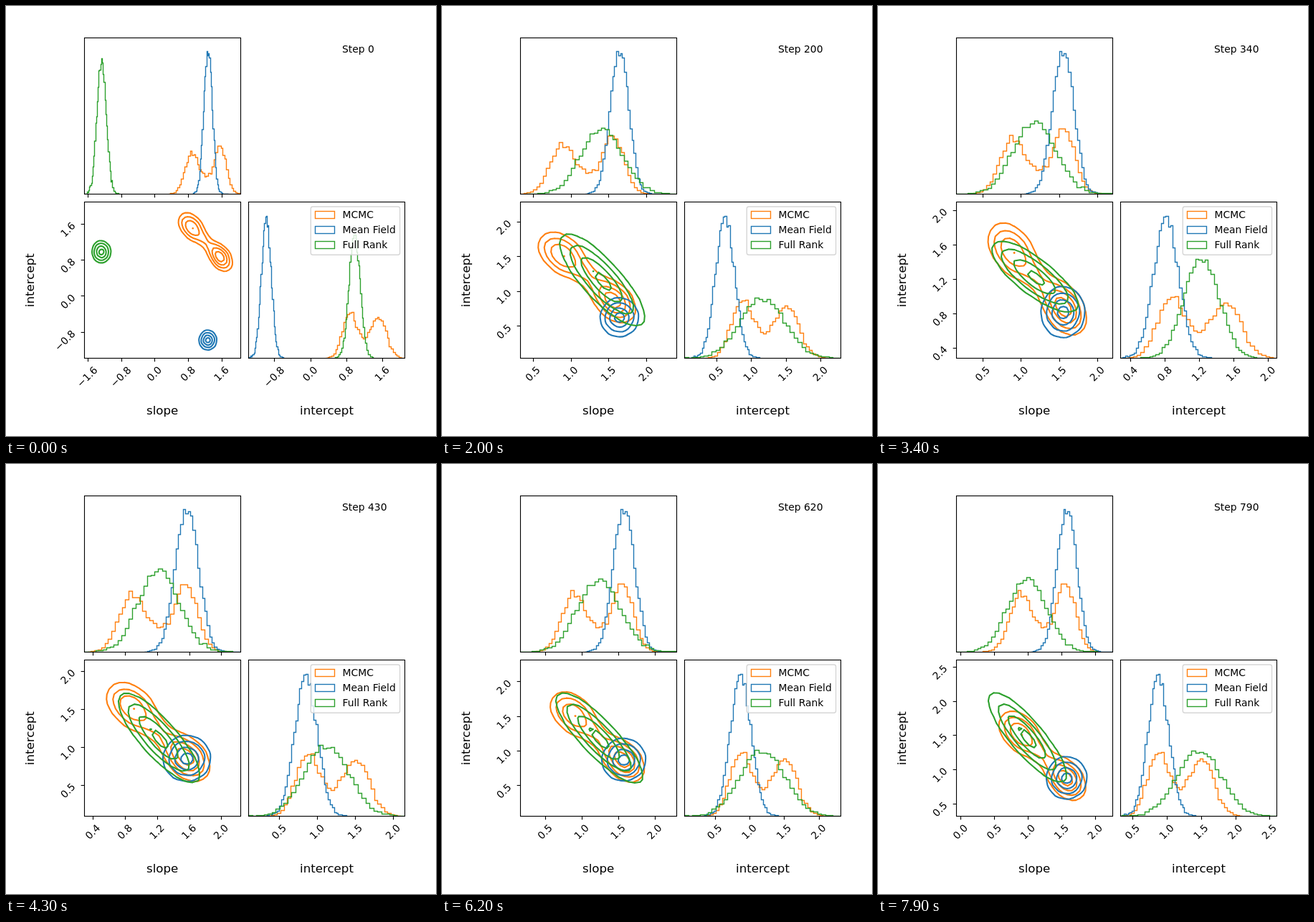
Write an HTML page that moves like this. It is 600x600 px and loops after 8000 ms.

```html
<!DOCTYPE html>
<html lang="en">
<head>
<meta charset="utf-8">
<style>
  html, body { margin: 0; width: 100%; height: 100%; overflow: hidden; background: #fff; }
  svg { display: block; width: 600px; height: 600px; font: 13.89px "DejaVu Sans", sans-serif; }
  .label { font-size: 16.67px; text-anchor: middle; }
  .tick { text-anchor: middle; }
  .line { fill: none; stroke-width: 1.39; }
  .contour { fill: none; stroke-width: 2.08; stroke-linecap: round; }
  .frame { fill: none; stroke: #000; stroke-width: 1.11; }
</style>
</head>
<body>
<svg id="stage" viewBox="0 0 600 600"></svg>
<script>
const SIZE = 218.18, X1 = 109.09, X2 = 338.18, BASE1 = 261.82, BASE2 = 490.91;
const COLORS = ['#ff7f0e', '#1f77b4', '#2ca02c'];
const NAMES = ['MCMC', 'Mean Field', 'Full Rank'];
const SAMPLES = 16000, BINS = 40, CELLS = 28, STEPS = 80;

// Waypoints of the full rank fit: step, slope mean and sd, intercept mean and sd.
const WAYPOINTS = [
  [0, -1.27, .11, .98, .122],
  [20, 1.41, .27, 1.163, .316],
  [34, 1.178, .276, 1.225, .2],
  [43, 1.22, .25, 1.12, .289],
  [54, 1.35, .222, 1.128, .232],
  [70, 1.12, .358, 1.245, .402],
  [79, .987, .283, 1.47, .318]
];

function fullRank(step) {
  const i = Math.max(1, WAYPOINTS.findIndex(w => w[0] >= step));
  const a = WAYPOINTS[i - 1], b = WAYPOINTS[i];
  let u = (step - a[0]) / (b[0] - a[0]);
  if (i === 1) u = 1 - (1 - u) ** 1.7;
  const [mx, sx, my, sy] = a.map((v, k) => v + (b[k] - v) * u).slice(1);
  // The ridge keeps its width, so a longer ellipse is more correlated.
  const rho = (.009 / (sx * sy) - 1) * (1 - Math.exp(-step / 6));
  return [mx, sx, my, sy, rho];
}

// The mean field fit settles: a damped swing in slope, plain decay elsewhere.
function meanField(step) {
  return [
    1.575 - .305 * Math.exp(-step / 14) * Math.cos(step * Math.PI / 18),
    .145 - .043 * Math.exp(-((step / 25) ** 2)),
    .875 - 1.858 * Math.exp(-step / 10),
    .152 - .044 * Math.exp(-step / 18),
    0
  ];
}

function random(seed) {
  return () => {
    seed = seed + 0x6D2B79F5 | 0;
    let t = Math.imul(seed ^ seed >>> 15, 1 | seed);
    t = t + Math.imul(t ^ t >>> 7, 61 | t) ^ t;
    return ((t ^ t >>> 14) >>> 0) / 4294967296;
  };
}

// Pairs of independent standard normal numbers.
function normals(seed) {
  const rnd = random(seed);
  return Array.from({ length: SAMPLES }, () => {
    const r = Math.sqrt(-2 * Math.log(1 - rnd())), a = 2 * Math.PI * rnd();
    return [r * Math.cos(a), r * Math.sin(a)];
  });
}

const place = ([p, q], [mx, sx, my, sy, rho]) =>
  [mx + sx * p, my + sy * (rho * p + Math.sqrt(1 - rho * rho) * q)];

function summary(points, ranges) {
  return {
    ranges,
    hists: ranges.map((range, d) => histogram(points.map(p => p[d]), range)),
    segments: contours(points, ranges)
  };
}

function histogram(values, [lo, hi]) {
  const width = (hi - lo) / BINS, heights = Array(BINS).fill(0);
  for (const v of values) {
    const i = Math.floor((v - lo) / width);
    if (i >= 0 && i < BINS) heights[i] += 1 / (values.length * width);
  }
  return { lo, width, heights };
}

// Contour lines around 12, 39, 68 and 86 percent of the mass.
function contours(points, [[xlo, xhi], [ylo, yhi]]) {
  const N = CELLS, dx = (xhi - xlo) / N, dy = (yhi - ylo) / N;
  let grid = Array(N * N).fill(0);
  for (const [x, y] of points) {
    const i = Math.floor((x - xlo) / dx), j = Math.floor((y - ylo) / dy);
    if (i >= 0 && i < N && j >= 0 && j < N) grid[j * N + i]++;
  }
  for (const s of [1, N, 1, N])
    grid = grid.map((v, k) => .58 * v + .21 * ((grid[k - s] || 0) + (grid[k + s] || 0)));

  const sorted = [...grid].sort((a, b) => b - a);
  const total = sorted.reduce((a, b) => a + b);
  const segments = [];
  for (const k of [.5, 1, 1.5, 2]) {
    let sum = 0;
    const level = sorted.find(v => (sum += v) >= total * (1 - Math.exp(-k * k / 2)));
    for (let j = 0; j < N - 1; j++) for (let i = 0; i < N - 1; i++) {
      const corners = [[i, j], [i + 1, j], [i + 1, j + 1], [i, j + 1]], hits = [];
      corners.forEach((a, c) => {
        const b = corners[(c + 1) % 4];
        const va = grid[a[1] * N + a[0]], vb = grid[b[1] * N + b[0]];
        if (va > level === vb > level) return;
        const u = (level - va) / (vb - va);
        hits.push([xlo + (a[0] + (b[0] - a[0]) * u + .5) * dx,
                   ylo + (a[1] + (b[1] - a[1]) * u + .5) * dy]);
      });
      for (let h = 0; h < hits.length; h += 2) segments.push([hits[h], hits[h + 1]]);
    }
  }
  return segments;
}

// Two modes with a thin bridge between them.
const MODES = [
  [.42, [.88, .16, 1.53, .17, -.45]],
  [.85, [1.57, .14, .86, .15, -.45]],
  [1, [1.22, .2, 1.2, .2, -.85]]
];
const chain = summary(
  normals(11).map((z, i) => place(z, MODES.find(m => (i + .5) / SAMPLES < m[0])[1])),
  [[.33, 2.05], [.34, 2.1]]);

// The same random draws serve every step; reach is their extent in sds.
function fit(seed, params, reach) {
  const draws = normals(seed);
  return step => {
    const p = params(step);
    const ranges = reach.map(([down, up], d) =>
      [p[2 * d] - down * p[2 * d + 1], p[2 * d] + up * p[2 * d + 1]]);
    return summary(draws.map(z => place(z, p)), ranges);
  };
}
const fits = [
  fit(5, meanField, [[3.7, 4.7], [3.65, 3.6]]),
  fit(9, fullRank, [[3.72, 3.67], [3.55, 3.57]])
];

function ticks([lo, hi]) {
  const raw = (hi - lo) / 5;
  const gap = [.1, .15, .2, .25, .3, .4, .5, .6, .8, 1].find(s => s >= raw);
  const list = [];
  for (let i = Math.ceil(lo / gap); i * gap <= hi; i++) list.push(i * gap);
  return list;
}

const snap = v => Math.round(v) + .5;
const scale = ([lo, hi], from, length) => v => from + (v - lo) / (hi - lo) * length;

function histPaths(hists, toX, base, clip) {
  const top = Math.max(...hists.flatMap(h => h.heights)) * 1.1;
  return `<g class="line" clip-path="url(#${clip})">` + hists.map((h, c) => {
    let d = `M${snap(toX(h.lo))} ${snap(base)}`;
    h.heights.forEach((v, i) => {
      d += `V${snap(base - v / top * SIZE)}H${snap(toX(h.lo + (i + 1) * h.width))}`;
    });
    return `<path d="${d}V${snap(base)}" stroke="${COLORS[c]}"/>`;
  }).join('') + '</g>';
}

function tickText(v, at) {
  const [x, y] = at(v < -.01 ? 33.8 : 22.1);
  return `<text class="tick" transform="translate(${x} ${y}) rotate(-45)" y="4.2">${
    v.toFixed(1).replace('-', '\u2212')}</text>`;
}

function xAxis(list, toX, base, labelled) {
  return list.map(v => {
    const x = toX(v);
    return `<path class="frame" d="M${snap(x)} ${snap(base)}v4.86"/>` + (labelled
      ? tickText(v, w => [x, base + 10.2 + (w + 13.5) * .3536]) : '');
  }).join('');
}

function yAxis(list, toY) {
  return list.map(v => {
    const y = toY(v);
    return `<path class="frame" d="M${snap(X1)} ${snap(y)}h-4.86"/>` +
      tickText(v, w => [99.4 - (w + 13.5) * .3536, y + w * .3536 + .5]);
  }).join('');
}

const PANELS = [[X1, BASE1, 'a'], [X1, BASE2, 'b'], [X2, BASE2, 'c']];
const box = (x, base) =>
  `x="${snap(x)}" y="${snap(base) - 218}" width="218" height="218"`;
const clips = PANELS.map(([x, b, id]) =>
  `<clipPath id="${id}"><rect ${box(x, b)}/></clipPath>`).join('');
const frames = PANELS.map(([x, b]) => `<rect class="frame" ${box(x, b)}/>`).join('');
const legend =
  '<rect x="425.3" y="280" width="124.3" height="67.3" rx="2.8" fill="#fff" fill-opacity=".8" stroke="#ccc" stroke-opacity=".8" stroke-width="1.39"/>' +
  NAMES.map((name, i) => {
    const y = 296 + i * 21;
    return `<rect class="line" x="431.5" y="${y - 9.5}" width="27" height="10" stroke="${COLORS[i]}"/>` +
      `<text x="469.5" y="${y}">${name}</text>`;
  }).join('');
const labels =
  '<text class="label" x="218.2" y="570">slope</text>' +
  '<text class="label" x="447.5" y="570">intercept</text>' +
  '<text class="label" transform="translate(39.2 382.7) rotate(-90)">intercept</text>';

function render(step) {
  const sets = [chain, ...fits.map(f => f(step))];
  const [slopes, inters] = [0, 1].map(d => [
    Math.min(...sets.map(s => s.ranges[d][0])),
    Math.max(...sets.map(s => s.ranges[d][1]))
  ]);
  const slopeX = scale(slopes, X1, SIZE);
  const interX = scale(inters, X2, SIZE);
  const interY = scale(inters, BASE2, -SIZE);
  const slopeTicks = ticks(slopes), interTicks = ticks(inters);

  const point = ([x, y]) => `${slopeX(x).toFixed(2)} ${interY(y).toFixed(2)}`;
  const rings = sets.map((set, c) => `<path stroke="${COLORS[c]}" d="${
    set.segments.map(([a, b]) => `M${point(a)}L${point(b)}`).join('')}"/>`).join('');

  document.getElementById('stage').innerHTML = `<defs>${clips}</defs>` +
    histPaths(sets.map(s => s.hists[0]), slopeX, BASE1, 'a') +
    `<g class="contour" clip-path="url(#b)">${rings}</g>` +
    histPaths(sets.map(s => s.hists[1]), interX, BASE2, 'c') +
    xAxis(slopeTicks, slopeX, BASE1, false) +
    xAxis(slopeTicks, slopeX, BASE2, true) +
    xAxis(interTicks, interX, BASE2, true) +
    yAxis(interTicks, interY) +
    frames + legend + labels + `<text x="469" y="65.3">Step ${step * 10}</text>`;
}

let shown = -1;
const start = performance.now();
function tick() {
  const step = Math.floor((performance.now() - start) / 100) % STEPS;
  if (step !== shown) render(shown = step);
  requestAnimationFrame(tick);
}
tick();
</script>
</body>
</html>
```
